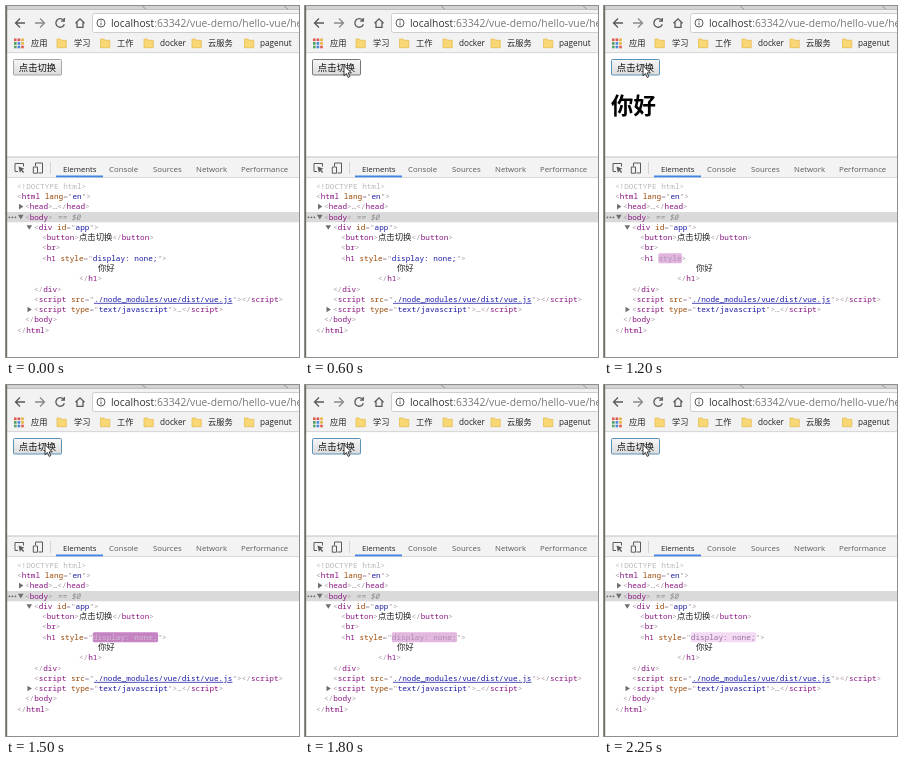
Animation of 293x351 px, one loop 2400 ms. Source, as an HTML page:

```html
<!DOCTYPE html>
<html lang="zh">
<head>
<meta charset="utf-8">
<style>
  html, body { margin: 0; height: 100%; overflow: hidden; background: #fff; }
  svg { display: block; width: 293px; height: 351px; }
  text { white-space: pre; font-family: "Open Sans", "Noto Sans CJK SC", "Noto Sans CJK", sans-serif; }
  .mark { font-size: 8.2px; fill: #222; }
  .tab { font-size: 7.8px; fill: #5a5a5a; }
  .code { font: 7.7px "Noto Sans Mono", "Noto Sans CJK SC", "Noto Sans CJK", monospace; }
  .cjk { font-size: 8.4px; fill: #222; }
  .p { fill: #a894a6; }
  .t { fill: #881280; }
  .a { fill: #994500; }
  .v { fill: #1a1aa6; }
  .link { fill: #1a1aa6; text-decoration: underline; }
  .g { fill: #b8b8b8; }
  .icon { fill: none; stroke: #5a5a5a; stroke-width: 1.3; }
</style>
</head>
<body>
<svg id="stage" viewBox="0 0 293 351"></svg>
<script>
const rect = (x, y, w, h, fill, more = '') =>
  `<rect x="${x}" y="${y}" width="${w}" height="${h}" fill="${fill}" ${more}/>`;
const text = (x, y, cls, body, more = '') => `<text x="${x}" y="${y}" class="${cls}" ${more}>${body}</text>`;
const path = (d, more = 'class="icon"') => `<path d="${d}" ${more}/>`;
const span = (cls, body, id = '') => `<tspan class="${cls}" ${id && `id="${id}"`}>${body}</tspan>`;

const attr = (name, value, cls = 'v', id) =>
  ' ' + span('a', name) + span('p', '="') + span(cls, value, id) + span('p', '"');
const open = (name, attrs = '') => span('p', '&lt;') + span('t', name) + attrs + span('p', '&gt;');
const close = name => span('p', '&lt;/') + span('t', name) + span('p', '&gt;');
const rowY = row => 182.7 + row * 10.29;
const line = (row, x, body, more) => text(x, rowY(row), 'code', body, more);
const arrow = (row, x, down) => {
  const y = rowY(row) - 2.7;
  return path(down ? `M${x} ${y - 2}h5.6l-2.8 4.6z` : `M${x + 1} ${y - 2.8}v5.6l4.4-2.8z`, 'fill="#6e6e6e"');
};

const folder = x => path(`M${x} 33h3.5l1 1.3h4.8v7.4h-9.3z`, 'fill="#f8d775" stroke="#e5b94d" stroke-width=".7"');
const bookmarks = [[51, 68, '学习'], [94.5, 111, '工作'], [138, 154, 'docker'], [186, 202, '云服务'], [238.5, 254, 'pagenut']];
const tabs = [[57, 'Elements'], [103, 'Console'], [147, 'Sources'], [190, 'Network'], [235, 'Performance']];
const dots = ['#e05a4b', '#d9534a', '#e8b13c', '#4c9c5d', '#4b86d6', '#e8b13c', '#58a668', '#4b86d6', '#e05a4b'];

const browser = [
  rect(0, 0, 293, 47, '#f2f2f2'),
  rect(0, 0, 293, 3, '#d2d2d2'),
  rect(0, 3, 293, .8, '#b5b5b5'),
  path('M136 0l4 3M278 0l4 3', 'stroke="#999" fill="none"'),
  path('M19 17H9.5M14 12.5L9.5 17l4.5 4.5'),
  path('M29 17h9.5M34 12.5l4.5 4.5-4.5 4.5', 'class="icon" style="stroke:#8a8a8a"'),
  path('M57.5 14.2a4.3 4.3 0 1 0 .8 4M58.3 12v3.2h-3.2'),
  path('M69.5 17.2l4.5-4.4 4.5 4.4M71 16.5v4.8h6v-4.8'),
  rect(86.5, 7.5, 215, 19, '#fff', 'rx="2" stroke="#c4c4c4" stroke-width=".8"'),
  '<circle cx="95" cy="17" r="4" class="icon" style="stroke-width:1"/>',
  path('M95 14.4v1.1M95 16.4v3', 'class="icon" style="stroke-width:1"'),
  text(105, 20.5, '', 'localhost' + span('', ':63342/vue-demo/hello-vue/help', 'urlTail'), 'font-size="10.3" fill="#333"'),
  dots.map((c, i) => rect(8 + i % 3 * 3.6, 32.5 + Math.floor(i / 3) * 3.6, 2.6, 2.6, c)).join(''),
  text(25, 40.4, 'mark', '应用'),
  bookmarks.map(([fx, tx, name]) => folder(fx) + text(tx, 40.4, 'mark', name)).join(''),
  rect(0, 46.4, 293, .7, '#c8c8c8'),
  rect(7.5, 53.5, 48, 15.5, 'url(#face)', 'id="button" rx="1" stroke-width="1"'),
  text(12.8, 64.7, '', '点击切换', 'font-size="9.33" fill="#111"'),
  text(7, 108, 'heading', '你好', 'id="heading" font-size="22.4" font-weight="bold"')
].join('');

const devtools = [
  rect(0, 151, 293, 200, '#fff'),
  rect(0, 151, 293, 20.5, '#f3f3f3'),
  rect(0, 150.6, 293, .8, '#b4b4b4'),
  rect(0, 171, 293, .7, '#ccc'),
  path('M12 165.5H9v-8h8.5v3', 'class="icon" style="stroke-width:1"'),
  path('M12.5 160.5l6 2.3-2.4 1 2 2.2-1 1-2-2.2-1.2 2.3z', 'fill="#5a5a5a"'),
  path('M29.5 160v-3h7v10h-4M27.3 161h4.2v6.2h-4.2z', 'class="icon" style="stroke-width:1"'),
  rect(44, 156, .8, 12, '#ccc'),
  tabs.map(([x, name], i) => text(x, 165.7, 'tab', name, i ? '' : 'style="fill:#222"')).join(''),
  rect(50, 169.5, 47, 1.8, '#4285e8'),
  rect(0, 206, 293, 10.3, '#dadada'),
  rect(0, 0, 1.2, 351, '#69735f'),
  line(0, 11, span('g', '&lt;!DOCTYPE html&gt;')),
  line(1, 11, open('html', attr('lang', 'en'))),
  arrow(2, 12), line(2, 19, open('head') + span('p', '…') + close('head')),
  [3.4, 6.4, 9.4].map(x => `<circle cx="${x}" cy="211.3" r=".9" fill="#666"/>`).join(''),
  arrow(3, 12, true), line(3, 19, open('body') + '<tspan fill="#888" font-style="italic"> == $0</tspan>'),
  arrow(4, 20.5, true), line(4, 28, open('div', attr('id', 'app'))),
  line(5, 36, open('button') + span('cjk', '点击切换') + close('button')),
  line(6, 36, open('br')),
  rect(54.3, 247.2, 23.6, 10, '', 'id="nameGlow" rx="1.5"'),
  rect(86.8, 247.2, 65.2, 10, '', 'id="valueGlow" rx="1.5"'),
  line(7, 36, open('h1', ' ' + span('', 'style', 'nameText')), 'id="shownLine"'),
  line(7, 36, open('h1', attr('style', 'display: none;', '', 'valueText')), 'id="hiddenLine"'),
  line(8, 92, span('cjk', '你好')),
  line(9, 73, close('h1')),
  line(10, 28, close('div')),
  line(11, 28, open('script', attr('src', './node_modules/vue/dist/vue.js', 'link')) + close('script')),
  arrow(12, 20.5), line(12, 28, open('script', attr('type', 'text/javascript')) + span('p', '…') + close('script')),
  line(13, 19, close('body')),
  line(14, 11, close('html'))
].join('');

const $ = id => document.getElementById(id);
$('stage').innerHTML = `<defs><linearGradient id="face" x2="0" y2="1">
  <stop stop-color="#f6f6f6"/><stop offset="1" stop-color="#dcdcdc"/></linearGradient></defs>` + browser + devtools +
  path('M0 0v10.2l2.4-2.2 1.7 3.9 1.7-.8-1.7-3.7h3.2z', 'id="cursor" fill="#fff" stroke="#222" stroke-width=".9"');
$('urlTail').style.fill = '#777';

const LOOP = 2400, STEP = 150;
const show = (id, on) => $(id).style.display = on ? '' : 'none';
const mix = (a, b, p) => `rgb(${a.map((v, i) => Math.round(v + (b[i] - v) * p))})`;
const glow = (id, age) => {
  const x = Math.min(1, Math.max(0, age / 1120)), p = 1 - (1 - x) ** 2;
  $(id + 'Glow').style.fill = mix([158, 54, 153], [245, 219, 244], p);
  $(id + 'Text').style.fill = mix([255, 255, 255], [150, 112, 160], p);
};

function draw(t) {
  const clicked = t >= 750, again = t >= 1350, shown = clicked && !again;
  show('heading', shown);
  show('shownLine', shown);
  show('nameGlow', shown);
  show('hiddenLine', !shown);
  show('valueGlow', again);
  glow('name', t - 620);
  glow('value', t - 1200);
  if (!again) $('valueText').style.fill = '#1a1aa6';

  const near = Math.min(1, Math.max(0, (t - 150) / 300));
  show('cursor', t >= 300);
  $('cursor').setAttribute('transform', `translate(${39 + 60 * (1 - near)} ${59.5 + 50 * (1 - near)})`);
  $('button').style.stroke = clicked ? '#5c93b8' : t >= 450 ? '#777' : '#a5a5a5';
}

function tick() {
  draw(Math.floor(performance.now() % LOOP / STEP) * STEP);
  requestAnimationFrame(tick);
}
tick();
</script>
</body>
</html>
```
